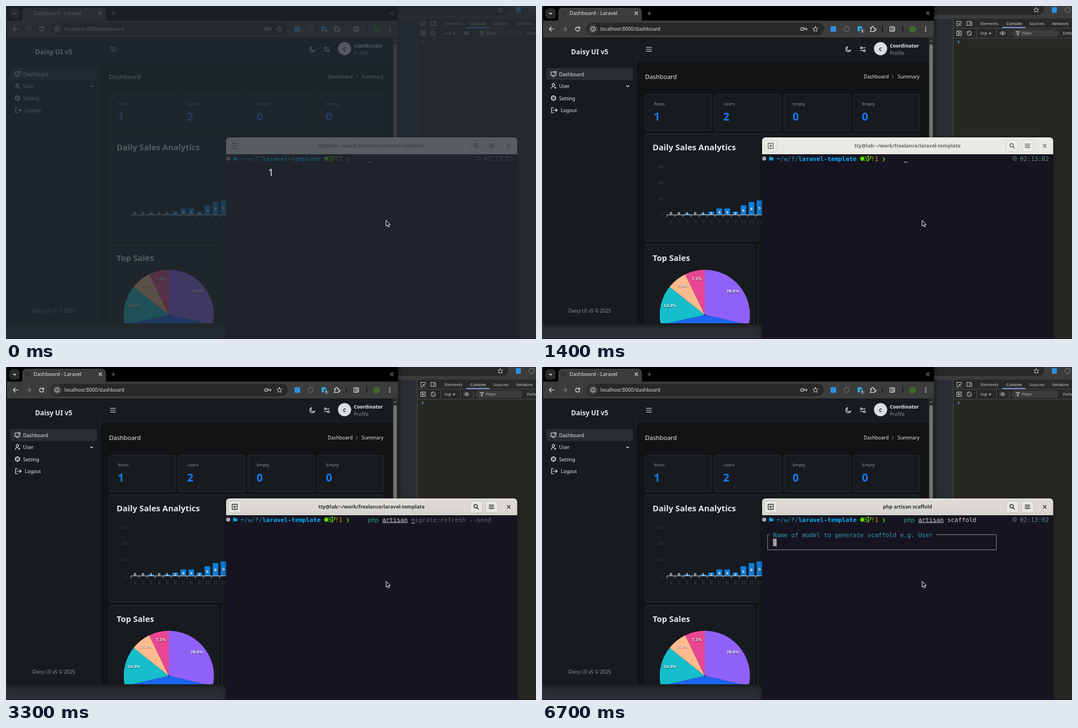
Animation, 944 px wide and 593 px high, one loop 8000 ms. Source, as an HTML page with a canvas:

```html
<!DOCTYPE html>
<html lang="en">
<head>
<meta charset="utf-8">
<title>Scaffold demo</title>
<style>
html, body { margin: 0; width: 100%; height: 100%; overflow: hidden; background: #1d2125; }
canvas { display: block; }
</style>
</head>
<body>
<canvas id="stage" width="944" height="593"></canvas>
<script>
const ctx = document.getElementById('stage').getContext('2d');
const LOOP = 8000, STEP = 100;
const SANS = '"Noto Sans", sans-serif';
const CHART = '"Liberation Sans", sans-serif';
const MONO = '"DejaVu Sans Mono", monospace';
const LIGHT = '#e6e8ea', MUTED = '#8f9398', PANEL = '#171b1f', LINE = '#2a2e32';

// ---- drawing helpers ----
function rect(x, y, w, h, fill, r = 0, stroke) {
  ctx.beginPath();
  ctx.roundRect(x, y, w, h, r);
  if (fill) { ctx.fillStyle = fill; ctx.fill(); }
  if (stroke) { ctx.strokeStyle = stroke; ctx.lineWidth = 1; ctx.stroke(); }
}
// y is the middle of the capitals
function text(s, x, y, size, color, { weight = 400, align = 'left', font = SANS } = {}) {
  ctx.font = `${weight} ${size}px ${font}`;
  ctx.textAlign = align;
  ctx.fillStyle = color;
  ctx.fillText(s, x, y + size * 0.36);
}
function icon(d, x, y, color, width = 1.1, fill) {
  const path = new Path2D(d);
  ctx.save();
  ctx.translate(x, y);
  ctx.lineWidth = width;
  ctx.lineCap = ctx.lineJoin = 'round';
  ctx.strokeStyle = color;
  if (fill) { ctx.fillStyle = fill; ctx.fill(path); }
  if (width) ctx.stroke(path);
  ctx.restore();
}
function dot(x, y, r, fill, stroke, width = 1) {
  ctx.beginPath();
  ctx.arc(x, y, r, 0, 7);
  if (fill) { ctx.fillStyle = fill; ctx.fill(); }
  if (stroke) { ctx.strokeStyle = stroke; ctx.lineWidth = width; ctx.stroke(); }
}
function withShadow(color, blur, dy, draw) {
  ctx.save();
  ctx.shadowColor = color;
  ctx.shadowBlur = blur;
  ctx.shadowOffsetY = dy;
  draw();
  ctx.restore();
}
const mix = (a, b, k) => `rgb(${a.map((v, i) => Math.round(v + (b[i] - v) * k))})`;

const CROSS = 'M-2.5-2.5L2.5 2.5M2.5-2.5L-2.5 2.5';
const PLUS = 'M-3 0H3M0-3V3';
const MENU = 'M-4.5-3.5H4.5M-4.5 0H4.5M-4.5 3.5H4.5';
const STAR = 'M0-4.5L1.3-1.5L4.6-1.2L2.1 1L2.9 4.2L0 2.5L-2.9 4.2L-2.1 1L-4.6-1.2L-1.3-1.5Z';
const DOWN = 'M-2-1L0 1L2-1';
const RIGHT = 'M-1.2-2.4L1.2 0L-1.2 2.4';
const LENS = 'M2-1A3 3 0 1 1-4-1A3 3 0 1 1 2-1M1.2 1.2L4 4';

// ---- window behind, with developer tools ----
function drawBackdrop() {
  rect(0, 0, 944, 593, '#2a2e32');
  rect(690, 0, 254, 23, '#3c3c3c');
  rect(600, -6, 294, 22, '#282828', 10);
  icon(STAR, 880.5, 7, '#c7c7c7', 1);
  rect(908, 2, 9, 10, '#2f8fdd', 1);
  dot(936, 7, 4.5, null, '#6d6d6d', 1.4);
  rect(732, 22.5, 212, 571, '#272822');
  rect(732, 23, 212, 34, '#29292a');
  rect(732, 39, 212, 1, '#47484a');
  rect(732, 57, 212, 1, '#47484a');
  rect(732, 23, 1, 570, '#4b4c4f');
  icon('M4-1V-4H-4V4H-1M0 0L4 4M0 0V3M0 0H3', 743, 31.5, '#c7c7c7', 1);
  icon('M-4 2V-3.5H4M-5 3.5H0M1.5-1.5H4.5V3.5H1.5Z', 761, 31, '#c7c7c7', 1);
  text('Elements', 781, 31.5, 7.4, '#c7c7c7');
  text('Console', 827, 31.5, 7.4, '#e3e3e3');
  text('Sources', 868, 31.5, 7.4, '#c7c7c7');
  text('Network', 908.5, 31.5, 7.4, '#c7c7c7');
  rect(820, 37.6, 41, 1.6, '#7cacf8');
  icon('M-4-4H4V4H-4ZM-1.5-4V4M.8-1.3L2.4 0L.8 1.3Z', 743, 48.5, '#c7c7c7', 1);
  dot(761, 48.5, 4, null, '#c7c7c7', 1);
  icon('M-2.7-2.7L2.7 2.7', 761, 48.5, '#c7c7c7', 1);
  text('top', 781, 48.5, 7.4, '#c7c7c7');
  icon('M-2.5-1.2H2.5L0 1.8Z', 798, 49, '#c7c7c7', 0, '#c7c7c7');
  rect(774, 42, 1, 13, '#4b4c4f');
  rect(809, 42, 1, 13, '#4b4c4f');
  icon('M-5 0Q0-6 5 0Q0 6-5 0Z', 820.5, 48.5, '#c7c7c7', 1);
  dot(820.5, 48.5, 1.5, '#c7c7c7');
  rect(832, 42, 1, 13, '#4b4c4f');
  rect(837, 42, 84, 13, '#3c3c3c', 6.5);
  icon('M-3-3H3L.8 0V3H-.8V0Z', 847.5, 48.5, '#c7c7c7', 1);
  text('Filter', 855, 48.5, 7.4, '#b5b5b5');
  text('Default', 927.5, 48.5, 7.4, '#c7c7c7');
  icon(RIGHT, 742, 64, '#6d9df0', 1.1);
}

// ---- browser window ----
function drawChrome(focused) {
  const control = focused ? '#fff' : '#7d7d7d';
  rect(2, 0, 696, 26, '#000');
  rect(6, 4, 18.5, 18.5, '#2b2b2b', 6);
  icon(DOWN, 15.3, 13.5, LIGHT, 1.3);
  rect(29, 3, 149, 30, '#3c3c3c', 7);
  dot(39, 13, 4, '#333639');
  text('Dashboard - Laravel', 49, 13, 9.1, LIGHT);
  icon(CROSS, 168, 13, LIGHT, 1.2);
  icon(PLUS, 191, 13, control, 1.2);
  icon(CROSS, 687, 13, control, 1.4);
  rect(2, 26, 696, 30, '#3c3c3c');
  icon('M4 0H-4M-.5-3.5L-4 0L-.5 3.5', 17, 41, LIGHT, 1.2);
  icon('M-4 0H4M.5-3.5L4 0L.5 3.5', 40, 41, '#777', 1.2);
  icon('M3.5 1A3.7 3.7 0 1 1 2.6-2.6M3.6-4V-1.2H.8', 63.5, 41, LIGHT, 1.2);
  rect(79, 30, 423, 22, '#282828', 11);
  dot(91, 41, 9, '#3c3c3c');
  dot(91, 41, 4, null, LIGHT, 1);
  icon('M0-.5V2M0-2V-1.9', 91, 41, LIGHT, 1);
  text('localhost:8000/dashboard', 104, 41, 8.75, '#dcdcdc');
  dot(463.5, 41, 2.7, null, '#c7c7c7', 1.2);
  icon('M-2-1.2H4V1.5H2V0H-2', 468, 41, '#c7c7c7', 1);
  icon(STAR, 487, 41, '#c7c7c7', 1);
  rect(514, 36, 10, 10, '#2f8fdd', 1);
  dot(542.5, 41, 4.3, null, '#6d6d6d', 1.3);
  rect(562, 36, 8, 9, '#2ba3e0', 1);
  rect(566, 40, 9, 9, '#444c55', 2);
  text('1', 570.5, 44.6, 7.5, '#fff', { align: 'center', weight: 600 });
  icon('M-4-2.5H-1.5A1.6 1.6 0 1 1 1.5-2.5H3.2V0A1.6 1.6 0 1 1 3.2 2V4.5H-4V2A1.5 1.5 0 0 0-4-1Z', 589, 41, LIGHT, 1.2);
  rect(606, 36, 1, 10, '#000');
  icon('M-4-4H4V4H-4ZM1.2-2H3M1.2 0H3M1.2 2H3M-1-4V4', 624, 41, LIGHT, 1);
  rect(642, 36, 1, 10, '#000');
  dot(660, 41, 6, '#3d6b2a');
  for (const dy of [-3.5, 0, 3.5]) dot(683.5, 41 + dy, 1.1, LIGHT);
}

function drawSidebar() {
  rect(2, 56, 166, 509, PANEL);
  rect(167.5, 56, 1, 509, '#23272b');
  text('Daisy UI v5', 85, 81.5, 12, LIGHT, { weight: 600, align: 'center' });
  rect(8, 110.5, 154, 21.5, '#2a2e32', 3);
  icon('M0-3.5H-4.5V2.5H4.5V1M-2 4.5H2M4.5-1V-4.5H1.5V-1Z', 20.5, 121, LIGHT);
  text('Dashboard', 30.5, 121.5, 8.6, LIGHT);
  icon('M2-2.2A2.2 2.2 0 1 1-2.4-2.2A2.2 2.2 0 1 1 2-2.2M-4 4.5Q-3.5 1 0 1M1.5 3H4.5M3 1.5V4.5', 20.5, 142.5, LIGHT);
  text('User', 30.5, 143, 8.6, LIGHT);
  icon(DOWN, 152.5, 143, LIGHT, 1.3);
  dot(20.5, 164, 3.9, null, LIGHT, 1.4);
  icon('M0-4.5V4.5M-4-2.2L4 2.2M-4 2.2L4-2.2', 20.5, 164, LIGHT, .9);
  dot(20.5, 164, 1.3, PANEL);
  text('Setting', 30.5, 164.5, 8.6, LIGHT);
  icon('M-1-4.5H-5V4.5H-1M-2 0H5M2.5-2.5L5 0L2.5 2.5', 22, 185.5, LIGHT, 1.2);
  text('Logout', 33.5, 186, 8.6, LIGHT);
  text('Daisy UI v5 © 2025', 85, 543, 8.6, MUTED, { align: 'center' });
}

function drawHeader() {
  rect(168, 56, 521, 42, PANEL);
  rect(168, 97.5, 521, 1, '#23272b');
  icon(MENU, 190.5, 77, LIGHT, 1.2);
  icon('M4.5 1.2A4.6 4.6 0 1 1-1-4.6A3.8 3.8 0 0 0 4.5 1.2Z', 545.5, 77, LIGHT, 1.2);
  icon('M-1-2.5H4.5M-4.5 2.5H1', 571.5, 77, LIGHT, 1.2);
  dot(568.8, 74.5, 1.7, null, LIGHT, 1.2);
  dot(574.2, 79.5, 1.7, null, LIGHT, 1.2);
  dot(603, 76, 11.7, '#dcdee0');
  text('C', 603, 76.5, 8.6, '#222', { weight: 600, align: 'center' });
  text('Coordinator', 619.5, 71, 8.6, LIGHT, { weight: 600 });
  text('Profile', 619.5, 83.5, 8.6, MUTED);
  text('Dashboard', 183.5, 126, 10.95, LIGHT);
  text('Dashboard', 573, 126, 8.6, LIGHT);
  icon(RIGHT, 625, 126, MUTED, .9);
  text('Summary', 633.5, 126, 8.6, LIGHT);
}

const card = (x, y, w, h) => rect(x + .5, y + .5, w - 1, h - 1, PANEL, 3, LINE);
const title = (s, x, y) => text(s, x, y, 14.6, LIGHT, { weight: 600 });
const axisLabel = (s, x, y, align) => text(s, x, y, 8, '#3a3e42', { align, font: CHART });
const valueLabel = (s, x, y, size = 8) => withShadow('rgba(0,0,0,.7)', 2, 1, () =>
  text(s, x, y, size, '#fff', { weight: 700, align: 'center', font: CHART }));

function drawBars() {
  const sales = [0, 0, 1, 0, 1, 2, 4, 4, 2, 6, 8, 9, 5, 10, 11, 8, 11, 3, 4, 12, 4, 0, 11, 16, 0, 9, 16, 5, 19, 21];
  const base = 372, left = 222.5, cell = 14.34, unit = 2.87;
  title('Daily Sales Analytics', 197, 252);
  for (let v = 0; v <= 30; v += 10) axisLabel(v, 216, base - v * unit, 'right');
  sales.forEach((v, i) => {
    rect(left + cell * (i + .5) - 5, base - v * unit, 10, v * unit, '#0a7fdc');
    axisLabel(i + 1, left + cell * (i + .5), 384.5, 'center');
  });
  rect(left, base - .5, cell * 30, 1, '#d8d8d8');
  for (let i = 0; i <= 30; i++) rect(left + cell * i - .5, base, 1, 4, '#aaa');
  sales.forEach((v, i) => valueLabel(v, left + cell * (i + .5), Math.min(368.7, base - v * unit / 2 + 1)));
}

function drawPie() {
  const slices = [[4, '#9061f9'], [6, '#1c64f2'], [2, '#16bdca'], [1, '#fdba8c'], [1, '#e74694']];
  const cx = 290, cy = 550, turn = Math.PI * 2 / 14;
  let start = -Math.PI / 2;
  title('Top Sales', 197, 449);
  const labels = slices.map(([n, color]) => {
    ctx.beginPath();
    ctx.moveTo(cx, cy);
    ctx.arc(cx, cy, 80.3, start, start + n * turn);
    ctx.fillStyle = color;
    ctx.fill();
    const mid = start + n * turn / 2;
    start += n * turn;
    return [(n / 14 * 100).toFixed(1) + '%', cx + 64 * Math.cos(mid), cy - 2.5 + 64 * Math.sin(mid)];
  });
  dot(cx, cy, 1.2, '#223');
  labels.forEach(([s, x, y]) => valueLabel(s, x, y, 7.8));
}

function drawAreas() {
  const hours = [0, 1.5, 2.5, 3.5, 4.5, 5.5, 6.5];
  const X = h => 427.5 + h * 34.6, Y = v => 579 - v * .8;
  title('Sales Performance', 398, 449);
  for (let v = 20; v <= 120; v += 20) axisLabel(v, 421, Y(v), 'right');
  const area = (values, rgb) => {
    const line = new Path2D();
    line.moveTo(X(0), Y(values[0]));
    for (let i = 1; i < hours.length; i++) {
      const x0 = X(hours[i - 1]), x1 = X(hours[i]), bend = (x1 - x0) * .4;
      line.bezierCurveTo(x0 + bend, Y(values[i - 1]), x1 - bend, Y(values[i]), x1, Y(values[i]));
    }
    const shape = new Path2D(line);
    shape.lineTo(X(6.5), 579);
    shape.lineTo(X(0), 579);
    const fade = ctx.createLinearGradient(0, 490, 0, 579);
    fade.addColorStop(0, `rgba(${rgb},.55)`);
    fade.addColorStop(1, `rgba(${rgb},.3)`);
    ctx.fillStyle = fade;
    ctx.fill(shape);
    ctx.strokeStyle = `rgb(${rgb})`;
    ctx.lineWidth = 2.6;
    ctx.stroke(line);
  };
  area([31, 40, 28, 51, 42, 109, 100], '0,143,251');
  area([11, 32, 45, 32, 34, 52, 41], '0,227,150');
  const tool = '#6e8192';
  dot(577.5, 471, 4, null, tool);
  icon('M-2 0H2M0-2V2', 577.5, 471, tool, 1);
  dot(590.5, 471, 4, null, tool);
  icon('M-2 0H2', 590.5, 471, tool, 1);
  icon(LENS, 605.5, 471.5, '#008ffb', 1.5);
  icon('M-2 4L-4 .5L-2 .5V-3.5H3.5V2L2.5 4Z', 620, 471.5, '#eee', 1, '#eee');
  icon('M-4.5 0L0-4L4.5 0H3.5V4H1V1H-1V4H-3.5V0Z', 634.5, 471, tool, .5, tool);
  icon(MENU, 647.5, 471, tool, 1.2);
}

function drawBrowser(focused) {
  withShadow('rgba(0,0,0,.6)', focused ? 14 : 10, 3, () => rect(2, -10, 696, 575, '#111315'));
  ctx.save();
  ctx.beginPath();
  ctx.rect(2, 0, 696, 565);
  ctx.clip();
  drawChrome(focused);
  drawSidebar();
  drawHeader();
  [['Roles', 1], ['Users', 2], ['Empty', 0], ['Empty', 0]].forEach(([name, n], i) => {
    const x = 183.5 + i * 123.6;
    card(x, 157, 119, 65.5);
    text(name, x + 16, 174.5, 7.55, MUTED);
    text(n, x + 15.5, 197, 19.5, '#157aff', { weight: 900 });
  });
  card(183.5, 227, 489, 192);
  card(183.5, 424, 195.5, 160);
  card(384, 424, 288.5, 160);
  drawBars();
  drawPie();
  drawAreas();
  rect(688.5, 56, 9.5, 509, '#2b2b2b');
  rect(690, 68, 6, 398, '#747474', 3);
  icon('M-2.5 1.5L0-1.5L2.5 1.5Z', 692.8, 62, '#777', 0, '#777');
  icon('M-2.5-1.5L0 1.5L2.5-1.5Z', 692.8, 558.5, '#777', 0, '#777');
  ctx.restore();
}

// ---- terminal ----
const CELL = 6.467, ROW = 13.55, PROMPT = 39;
const RECENT = 'php artisan migrate:refresh --seed', COMMAND = 'php artisan scaffold';
// time, typed text, suggested rest, cursor shown
const TYPING = [
  [0, '', '', 1],
  [2200, '', '', 0],
  ...[1, 2, 3, 4, 5, 5, 6].map((n, i) => [2500 + i * 100, RECENT.slice(0, n), RECENT.slice(n), 1]),
  [3300, RECENT.slice(0, 12), RECENT.slice(12), 1],
  [3900, COMMAND.slice(0, 13), '', 1],
  [4500, COMMAND.slice(0, 13), 'c', 0],
  [4600, COMMAND.slice(0, 14), '', 1],
  [4900, COMMAND.slice(0, 15), 'ffold', 1],
  [5100, COMMAND.slice(0, 15), '', 1],
  [5700, COMMAND.slice(0, 15), 'ffold', 0],
  [6000, COMMAND, '', 1],
  [6500, COMMAND, '', 0],
];
const colX = c => 392.1 + c * CELL;
const rowY = r => 271.7 + r * ROW;
const cells = (s, c, color, weight, row = 0) =>
  text(s, colX(c), rowY(row), 10.742, color, { weight, font: MONO });
const underline = (c, n, color = '#d0cfcc', row = 0) => rect(colX(c), 276.6 + row * ROW, CELL * n, 1, color);
const cursorLine = (c, row) => rect(colX(c), 277.6 + row * ROW, CELL, 1, '#d0cfcc');

function drawTitleBar(running, k) {
  const ink = mix([139, 139, 134], [46, 52, 54], k);
  const edge = mix([222, 220, 214], [200, 196, 188], k);
  const button = mix([238, 237, 231], [232, 230, 226], k);
  const bar = ctx.createLinearGradient(0, 234, 0, 264);
  bar.addColorStop(0, mix([245, 244, 239], [224, 221, 217], k));
  bar.addColorStop(1, mix([243, 242, 236], [215, 211, 205], k));
  rect(392, 234, 518.5, 30, bar, [6, 6, 0, 0]);
  for (const x of [396, 826, 853.5]) rect(x + .5, 238.5, 22, 21, button, 3, edge);
  icon('M-4.5-4.5H4.5V4.5H-4.5ZM-2 0H2M0-2V2', 407.3, 249, ink, 1.3);
  icon(LENS, 837.5, 249, ink, 1.5);
  icon('M-4-3H4M-4 0H4M-4 3H4', 864.7, 249, ink, 1.4);
  icon(CROSS, 895.3, 249, ink, 1.5);
  text(running ? COMMAND : 'tty@lab:~/work/freelance/laravel-template', 651, 249, 8.8, ink,
    { weight: 700, align: 'center' });
}

function drawPrompt() {
  dot(395.7, 271.7, 3.6, '#a9a9ad');
  icon('M-3.5 3V-3H-1L0-2H3V-.5H-2L-3.5 3H2.7L4-.5H-2', 408.5, 271.7, '#0aa0d8', .6, '#0aa0d8');
  cells('~/w/f/', 4, '#2793b8');
  cells('~', 4, '#00afff', 700);
  cells('laravel-template', 10, '#00afff', 700);
  dot(570.5, 271.7, 3.8, '#5fd700');
  icon('M-2-3V3M-2 1.5Q2.5 1 2.5-2', 583, 271.7, '#5fd700', 1.2);
  for (const [x, y] of [[581, 267.5], [581, 275.7], [585.5, 269]]) dot(x, y, 1.4, '#5fd700');
  cells('v3', 27, '#5fd700');
  cells('!1', 30, '#d7af00');
  cells('❯', 33, '#5fd700');
}

function drawInput(typed, rest, cursor) {
  const php = typed.slice(0, 3);
  cells(php, PROMPT, php.length < 3 ? '#c01c28' : '#26a27a', php.length < 3 ? 700 : 400);
  cells(typed.slice(4), PROMPT + 4, '#d0cfcc');
  cells(rest, PROMPT + typed.length, '#67656f');
  underline(PROMPT + 4, Math.max(0, Math.min(7, typed.length - 4)));
  if (typed.length === 13 || typed.length === 14) underline(PROMPT + 12, 1);
  if (cursor) cursorLine(PROMPT + typed.length, 0);
  if (typed.length + rest.length < 30) {
    dot(841.8, 271.7, 3.3, null, '#5f8787', 1);
    icon('M0-2V0H-1.5', 841.8, 271.7, '#5f8787', .9);
    cells('02:13:02', 71, '#5f8787');
  }
}

function drawQuestion() {
  const top = rowY(2) - .2, bottom = rowY(4) - .4, left = colX(1.5), right = colX(64.5);
  icon(`M${colX(2)} ${top}H${left}V${bottom}H${right}V${top}H${colX(48)}`, 0, 0, '#85838c', 1);
  cells('Name of model to generate scaffold e.g. User', 3, '#2aa1b3', 400, 2);
  rect(colX(3), 305.7, CELL, 13.5, '#a19fa5');
}

function drawTerminal(t) {
  const k = 1 - (1 - Math.min(1, Math.max(0, (t - 1350) / 350))) ** 3;
  const running = t >= 6500;
  withShadow('rgba(0,0,0,.5)', 10, 2, () => rect(392, 234, 518.5, 370, '#171421', [6, 6, 0, 0]));
  drawTitleBar(running, t < 1400 ? 0 : k);
  const [, ...state] = TYPING.findLast(([from]) => from <= t);
  drawPrompt();
  drawInput(...state);
  if (t >= 6700) drawQuestion();
  else if (running) cursorLine(0, 1);
}

// ---- scene ----
function drawScene(t) {
  const browserOnTop = t >= 600 && t < 1400;
  drawBackdrop();
  if (browserOnTop) drawTerminal(t);
  drawBrowser(browserOnTop);
  if (!browserOnTop) drawTerminal(t);
  if (t < 100) {
    rect(0, 0, 944, 592, 'rgba(35,42,48,.74)');
    text('1', 472, 297, 18, '#e4e6e8', { align: 'center' });
  }
  rect(0, 592, 944, 1, '#1b1a20');
  icon('M0 0V10L2.3 8L4 11.5L5.7 10.7L4.1 7.3H7Z', 677, 382, '#fff', 1, '#000');
}

let shown = -1;
function frame(now) {
  const t = Math.floor(now % LOOP / STEP) * STEP;
  if (t !== shown) drawScene(shown = t);
  requestAnimationFrame(frame);
}
drawScene(0);
requestAnimationFrame(frame);
</script>
</body>
</html>
```
